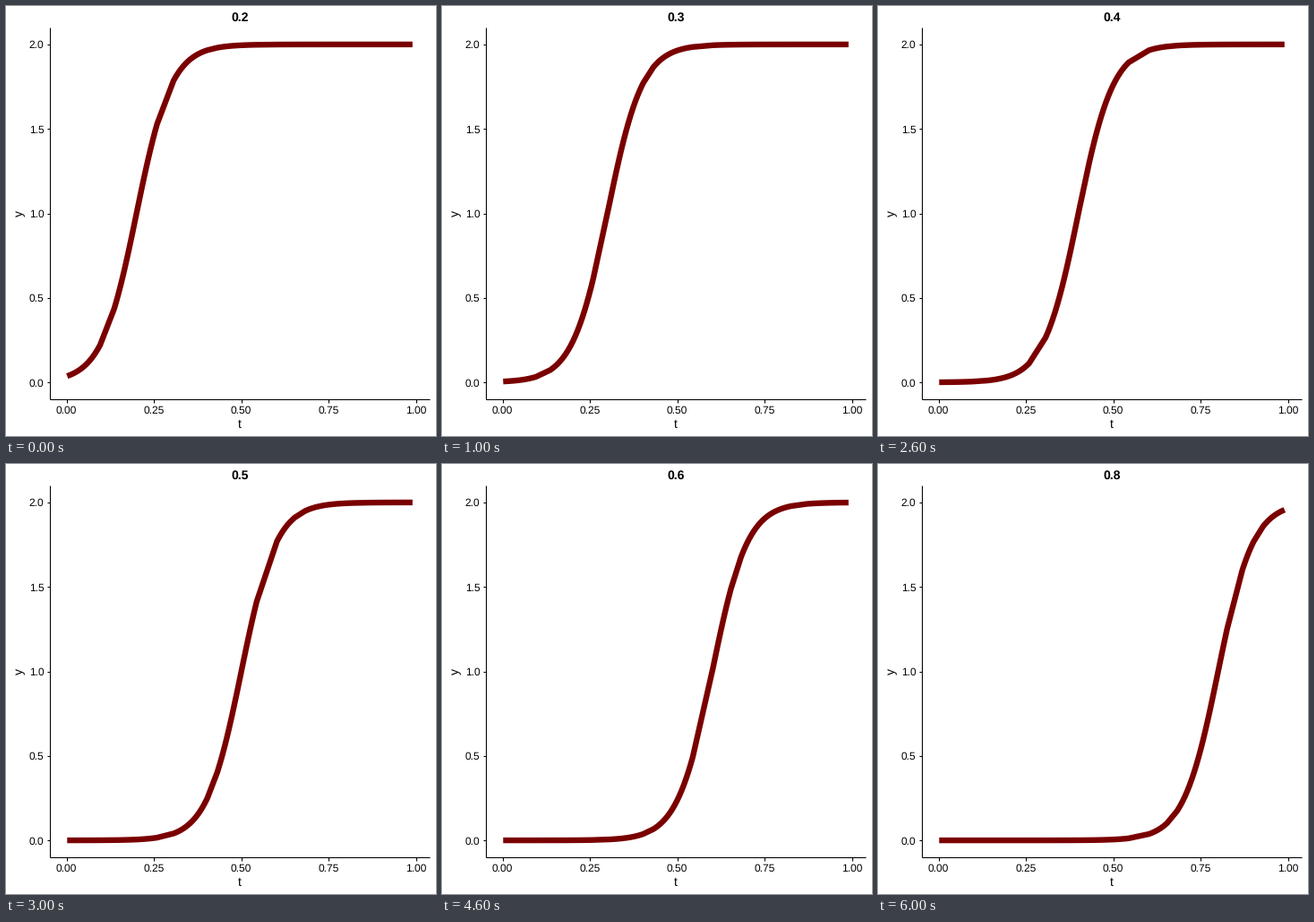
Animation of 480x480 px, one loop 7 s. Source, as a matplotlib script:

```python
import numpy as np
import matplotlib.pyplot as plt
from matplotlib.animation import FuncAnimation

SIZE, DPI = 480, 72          # at 72 dpi one point equals one pixel
LEFT, RIGHT, TOP, BOTTOM = 49, 473, 24, 439
RATE, CEILING = 20, 2
MIDPOINTS = np.arange(2, 9) / 10
# stretches of t without samples, bridged by straight segments
GAPS = [(0.096, 0.136), (0.259, 0.306), (0.403, 0.431), (0.544, 0.602),
        (0.654, 0.682), (0.826, 0.869), (0.902, 0.928)]

plt.rcParams["font.family"] = "Liberation Sans"
plt.rcParams["text.hinting"] = "none"
plt.rcParams["path.simplify"] = False


def px(t):
    return 67.7 + 390 * t


def py(y):
    return 420.1 - 188.6 * y


def logistic(t, mid):
    return CEILING / (1 + np.exp(-RATE * (t - mid)))


def sample_times():
    t = np.linspace(0.0015, 0.99, 150)
    for a, b in GAPS:
        t = np.append(t[(t <= a) | (t >= b)], (a, b))
    return np.sort(t)


fig = plt.figure(figsize=(SIZE / DPI, SIZE / DPI), dpi=DPI, facecolor="white")
ax = fig.add_axes([0, 0, 1, 1])
ax.set(xlim=(0, SIZE), ylim=(SIZE, 0))
ax.axis("off")


def rule(xs, ys):
    ax.plot(xs, ys, color="black", lw=1.07, solid_capstyle="butt")


def label(x, y, text, size, ha="center", **kw):
    return ax.text(x, y, text, fontsize=size, ha=ha, va="baseline",
                   color="black", **kw)


times = sample_times()
curve, = ax.plot([], [], color="#7A0000", lw=6.4, solid_capstyle="butt",
                 solid_joinstyle="round")

rule([LEFT, LEFT], [TOP, BOTTOM])
rule([LEFT, RIGHT], [BOTTOM, BOTTOM])
for v in np.linspace(0, 1, 5):
    rule([px(v)] * 2, [BOTTOM, BOTTOM + 3.5])
    label(px(v), 455, f"{v:.2f}", 12)
for v in np.linspace(0, CEILING, 5):
    rule([LEFT - 3.5, LEFT], [py(v)] * 2)
    label(42.5, py(v) + 4.4, f"{v:.1f}", 12, ha="right")
label(261, 471, "t", 14)
label(19, 231.5, "y", 14, rotation=90, rotation_mode="anchor")
title = label(261, 17, "", 14, weight="bold")


def draw(i):
    mid = MIDPOINTS[i]
    curve.set_data(px(times), py(logistic(times, mid)))
    title.set_text(f"{mid:.1f}")
    return curve, title


anim = FuncAnimation(fig, draw, frames=len(MIDPOINTS), interval=1000,
                     repeat=True, repeat_delay=0)
plt.show()
```
